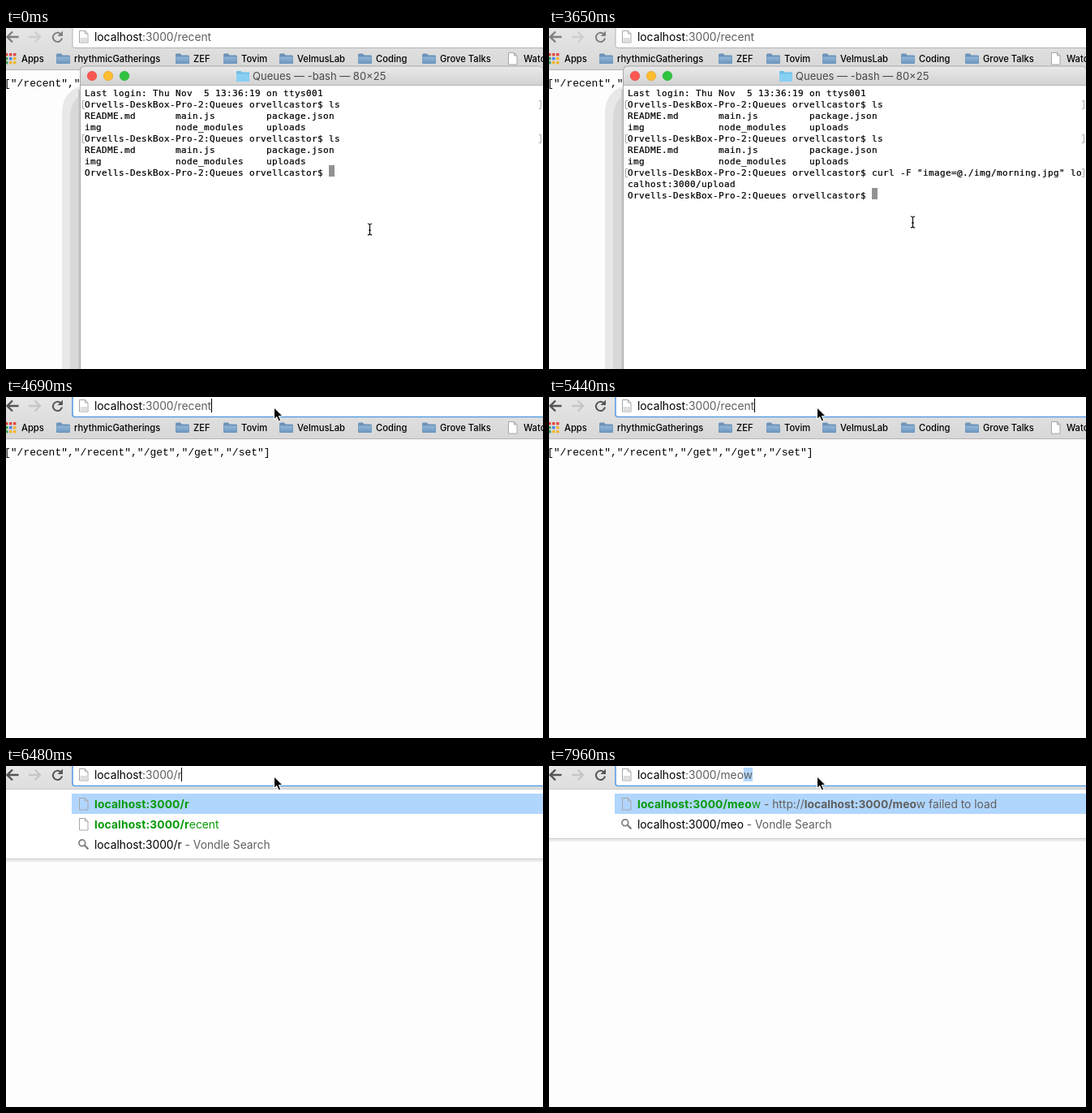
Recreate the animation shown at these times as an HTML page. Size 662 by 420 pixels, loop 8 s.

```html
<!DOCTYPE html>
<html lang="en">
<head>
<meta charset="utf-8">
<title>Upload demo</title>
<style>
  html, body { margin: 0; width: 100%; height: 100%; overflow: hidden; background: #fdfdfd; }
  svg { display: block; width: 662px; height: 420px; }
  text { white-space: pre; font-family: Inter, sans-serif; }
  .bar text { font-size: 11.2px; font-weight: 500; fill: #000; }
  .omni { font-size: 13.8px; fill: #000; }
  .title { font-size: 13px; fill: #4a4a4a; }
  .page { font: 13px "Liberation Mono", monospace; }
  .term { font: 11px "DejaVu Sans Mono", monospace; letter-spacing: .378px; stroke: #000; stroke-width: .22px; }
  .green { fill: #069a06; }
  .dim { fill: #5f5f5f; }
  .bold { font-weight: 700; }
  .green.bold { letter-spacing: .15px; }
</style>
</head>
<body>
<svg viewBox="0 0 662 420">
  <defs>
    <linearGradient id="chrome" x2="0" y2="1">
      <stop stop-color="#e6e6e6"/><stop offset="1" stop-color="#d7d7d7"/>
    </linearGradient>
    <linearGradient id="titlebar" x2="0" y2="1">
      <stop stop-color="#e9e9e9"/><stop offset="1" stop-color="#d1d1d1"/>
    </linearGradient>
    <linearGradient id="blue" x2="0" y2="1">
      <stop stop-color="#94b6d6"/><stop offset="1" stop-color="#6f99c2"/>
    </linearGradient>
    <g id="folder">
      <path d="M0 2q0-1.5 1.5-1.5h4.5l1.5 2h8q1.5 0 1.5 1.5v8q0 1-1 1H1q-1 0-1-1z" fill="#6b93b9"/>
      <path d="M.5 4.5h16v7.5h-16z" fill="url(#blue)"/>
    </g>
    <path id="doc" d="M.5.5h7l3.5 3.5v11H.5zM7.5.5v3.5h3.5" stroke="#a6a6a6"/>
    <g id="lens" fill="none" stroke="#808080">
      <circle cx="4.8" cy="4.8" r="3.9" stroke-width="1.7"/>
      <path d="M7.8 7.8l4.6 4.6" stroke-width="2.3"/>
    </g>
    <path id="bar" d="M.8 1q2.200 0 2.700 1.500Q4 1 6.200 1M3.500 2.500v11M.8 15q2.200 0 2.700-1.500Q4 15 6.200 15M2 9h3"/>
  </defs>

  <rect width="662" height="420" fill="#fdfdfd"/>
  <text class="page" x="-2" y="72">["/recent","/recent","/get","/get","/set"]</text>

  <rect width="662" height="52" fill="url(#chrome)"/>
  <path d="M0 51.5h662" stroke="#b4b4b4"/>
  <g id="nav" fill="none" stroke="#555" stroke-width="2.4">
    <path d="M15.5 11H2M8 4.5L1.5 11 8 17.5"/>
    <path d="M28 11h13.500M35.500 4.500L42 11l-6.500 6.500" stroke="#c6c6c6"/>
    <path d="M67.300 7.300A5.600 5.600 0 1 0 69 12.500" stroke-width="2"/>
    <path d="M70 3.500v6.500h-6.500z" fill="#555" stroke="none"/>
  </g>
  <rect id="box" x="82" y="-8" width="600" height="32.500" rx="3" fill="#fff"/>
  <use href="#doc" x="90" y="3" fill="#fff"/>
  <path d="M91.500 12h9v5.500h-9z" fill="#dedede"/>
  <rect id="sel" y="2" height="17" fill="#b3d7fe"/>
  <text id="url" class="omni" x="109" y="16"></text>
  <rect id="caret" y="2" width="1" height="17"/>

  <g id="marks" class="bar"></g>
  <g id="menu"></g>

  <g id="window">
    <path d="M69 420V104Q70 78 92 72V420z" fill="#e8e8e8"/>
    <path d="M79 420V110Q80 90 92 83V420z" fill="#d8d8d8"/>
    <path d="M89 420V76h3v344z" fill="#cacaca"/>
    <path d="M91 420V53q0-6.500 6-6.500h559q6 0 6 6V420z" fill="#a9a9a9"/>
    <path d="M92 71V53q0-5.500 5.500-5.500h559q5.500 0 5.500 5.500V71z" fill="url(#titlebar)"/>
    <path d="M92 70.500h570" stroke="#b5b5b5"/>
    <path d="M92 71h570v349H92z" fill="#fff"/>
    <g stroke-width=".6">
      <circle cx="106" cy="59" r="5.800" fill="#fc5753" stroke="#df4744"/>
      <circle cx="126" cy="59" r="5.800" fill="#fdbc2f" stroke="#de9f2b"/>
      <circle cx="146" cy="59" r="5.800" fill="#2fc440" stroke="#27aa35"/>
    </g>
    <path d="M284 54q0-1 1-1h4.500l1.500 1.500h8q1 0 1 1V65q0 1-1 1h-14q-1 0-1-1z" fill="#6fbfe9"/>
    <path d="M284 56.500h16V65q0 1-1 1h-14q-1 0-1-1z" fill="#86cff4"/>
    <text class="title" x="304" y="64">Queues — -bash — 80×25</text>
    <g id="lines"></g>
  </g>

  <g id="ibeam" fill="none">
    <use href="#bar" stroke="#fff" stroke-width="2.400" opacity=".8"/>
    <use href="#bar" stroke="#000" stroke-width="1.100"/>
  </g>
  <path id="arrow" d="M1.500 1v14.500l3.300-3.100 2.400 5.400 2.500-1.100-2.400-5.200h4.700z" stroke="#fff"/>
</svg>

<script>
const $ = id => document.getElementById(id);
const show = (el, on) => el.setAttribute('display', on ? 'inline' : 'none');
const set = (el, attrs) => { for (const k in attrs) el.setAttribute(k, attrs[k]); };
const span = (cls, s) => `<tspan class="${cls}">${s}</tspan>`;
const use = (id, x, y, fill = 'none') => `<use href="#${id}" x="${x}" y="${y}" fill="${fill}"/>`;

// Bookmarks bar
const dots = ['#e2483d', '#e2483d', '#e2483d', '#35a155', '#4584ea', '#f2b52c', '#35a155', '#f2b52c', '#f2b52c'];
const folders = [[62, 'rhythmicGatherings'], [209, 'ZEF'], [268, 'Tovim'], [337, 'VelmusLab'], [434, 'Coding'], [513, 'Grove Talks']];
const label = (x, s) => `<text x="${x}" y="42">${s}</text>`;
$('marks').innerHTML =
  dots.map((c, i) => `<rect x="${-1 + i % 3 * 5}" y="${31 + (i / 3 | 0) * 5}" width="3.400" height="3.400" fill="${c}"/>`).join('') +
  label(19, 'Apps') +
  folders.map(([x, s]) => use('folder', x, 31) + label(x + 22, s)).join('') +
  use('doc', 619, 30, '#fff') + label(638, 'Watch Later');

// Terminal contents
const prompt = 'Orvells-DeskBox-Pro-2:Queues orvellcastor$ ';
const listing = ['README.md       main.js         package.json', 'img             node_modules    uploads'];
const start = ['Last login: Thu Nov  5 13:36:19 on ttys001', prompt + 'ls', ...listing, prompt + 'ls', ...listing];
const command = [prompt + 'curl -F "image=@./img/morning.jpg" lo', 'calhost:3000/upload'];
const screens = [
  { rows: [...start, prompt], marks: [1, 4] },
  { rows: [...start, ...command], marks: [1, 4] },
  { rows: [...start, ...command, prompt], marks: [1, 4, 7] }
];

function drawTerminal({ rows, marks }) {
  const last = rows.length - 1;
  $('lines').innerHTML =
    `<rect x="${97 + rows[last].length * 7}" y="${73 + last * 14 - 2}" width="7" height="14" fill="#929292"/>` +
    rows.map((s, i) => `<text class="term" x="97" y="${84 + i * 14}">${s}</text>`).join('') +
    marks.map(i => `<path d="M97 ${75.5 + i * 14}h-2.500v10h2.500M657 ${75.5 + i * 14}h2.500v10h-2.500" fill="none" stroke="#a8a8a8"/>`).join('');
}

// Address bar suggestions
const host = 'localhost:3000';
const link = (hit, rest = '') => span('green bold', hit) + span('green', rest);
const search = s => s + span('dim', ' - Vondle Search');
const failed = (hit, rest) => link(hit, rest) + span('dim', ' - http://') +
  span('dim bold', hit) + span('dim', rest + ' failed to load');

function recentMenu(n) {
  const typed = host + '/' + 'recent'.slice(0, n);
  return [link(typed), link(typed, 'recent'.slice(n)), search(typed)];
}
function meowMenu(n) {
  const typed = host + '/' + 'meow'.slice(0, n);
  return [failed(typed, 'meow'.slice(n)), search(typed)];
}
const homeMenu = [link(host), ...['get', 'set', 'recent'].map(s => link(host + '/', s)),
  failed(host + '/', 'meow'), search(host + '/')];

function drawMenu(rows) {
  if (!rows) { $('menu').innerHTML = ''; return; }
  const end = 39 + rows.length * 25;
  $('menu').innerHTML =
    `<rect y="${end}" width="662" height="4" fill="#ececec"/>` +
    `<rect y="28" width="662" height="${end - 28}" fill="#fff"/>` +
    `<path d="M0 28.500h662M0 ${end + .5}h662" stroke="#cacaca"/>` +
    '<rect x="81" y="34" width="581" height="25" fill="#b1d6fd"/>' +
    rows.map((s, i) => (i < rows.length - 1 ? use('doc', 90, 39 + i * 25) : use('lens', 89, 40 + i * 25)) +
      `<text class="omni" x="109" y="${52 + i * 25}">${s}</text>`).join('');
}

// Each step overrides part of the state before it
const ibeam = (x, y) => ({ pointer: ['ibeam', x, y] });
const arrow = (x, y) => ({ pointer: ['arrow', x, y] });
const typeRecent = n => ({ path: 'recent'.slice(0, n), menu: recentMenu(n) });
const steps = [
  [0, { screen: 0, path: 'recent', focus: false, caret: false, selectFrom: -1, menu: null, ...ibeam(445, 240) }],
  [500, { screen: 1 }],
  [1700, { screen: 2 }],
  [3650, ibeam(445, 231)],
  [3800, { pointer: null }],
  [4100, ibeam(486, 115)],
  [4250, arrow(374, 6)],
  [4400, arrow(355, 12)],
  [4540, arrow(329, 12)],
  [4690, { screen: -1, focus: true, caret: true }],
  [4840, { caret: false, selectFrom: 0 }],
  [5440, { caret: true, selectFrom: -1 }],
  [5890, typeRecent(5)],
  [6040, typeRecent(4)],
  [6180, typeRecent(3)],
  [6330, typeRecent(2)],
  [6480, typeRecent(1)],
  [6620, ibeam(328, 7)],
  [6770, { path: '', menu: homeMenu, ...arrow(329, 12) }],
  [7220, { caret: false }],
  [7660, { path: 'meow', selectFrom: host.length + 2, menu: meowMenu(1) }],
  [7810, { selectFrom: host.length + 3 }],
  [7960, { selectFrom: host.length + 4, menu: meowMenu(3) }]
];
let merged = {};
const states = steps.map(([, change]) => merged = { ...merged, ...change });

function draw(s) {
  show($('window'), s.screen >= 0);
  if (s.screen >= 0) drawTerminal(screens[s.screen]);
  drawMenu(s.menu);

  const url = $('url');
  url.innerHTML = 'localhost' + span('dim', ':3000/' + s.path);
  const width = url.getComputedTextLength();
  set($('nav'), { opacity: s.focus ? 1 : .7 });
  set($('box'), { stroke: s.focus ? '#5a9fe4' : '#b2b2b2', 'stroke-width': s.focus ? 1.6 : 1 });
  set($('caret'), { x: Math.round(108.5 + width) });
  show($('caret'), s.caret);
  const selected = s.selectFrom >= 0;
  show($('sel'), selected);
  if (selected) {
    const skip = s.selectFrom ? url.getSubStringLength(0, s.selectFrom) : 0;
    set($('sel'), { x: 109 + skip, width: width - skip });
  }

  for (const id of ['ibeam', 'arrow']) {
    const on = s.pointer && s.pointer[0] === id;
    show($(id), on);
    if (on) set($(id), { transform: `translate(${s.pointer[1]} ${s.pointer[2]})` });
  }
}

let current = -1;
function tick() {
  const t = performance.now() % 8000;
  const i = steps.findLastIndex(([at]) => at <= t);
  if (i !== current) draw(states[current = i]);
  requestAnimationFrame(tick);
}
tick();
</script>
</body>
</html>
```
